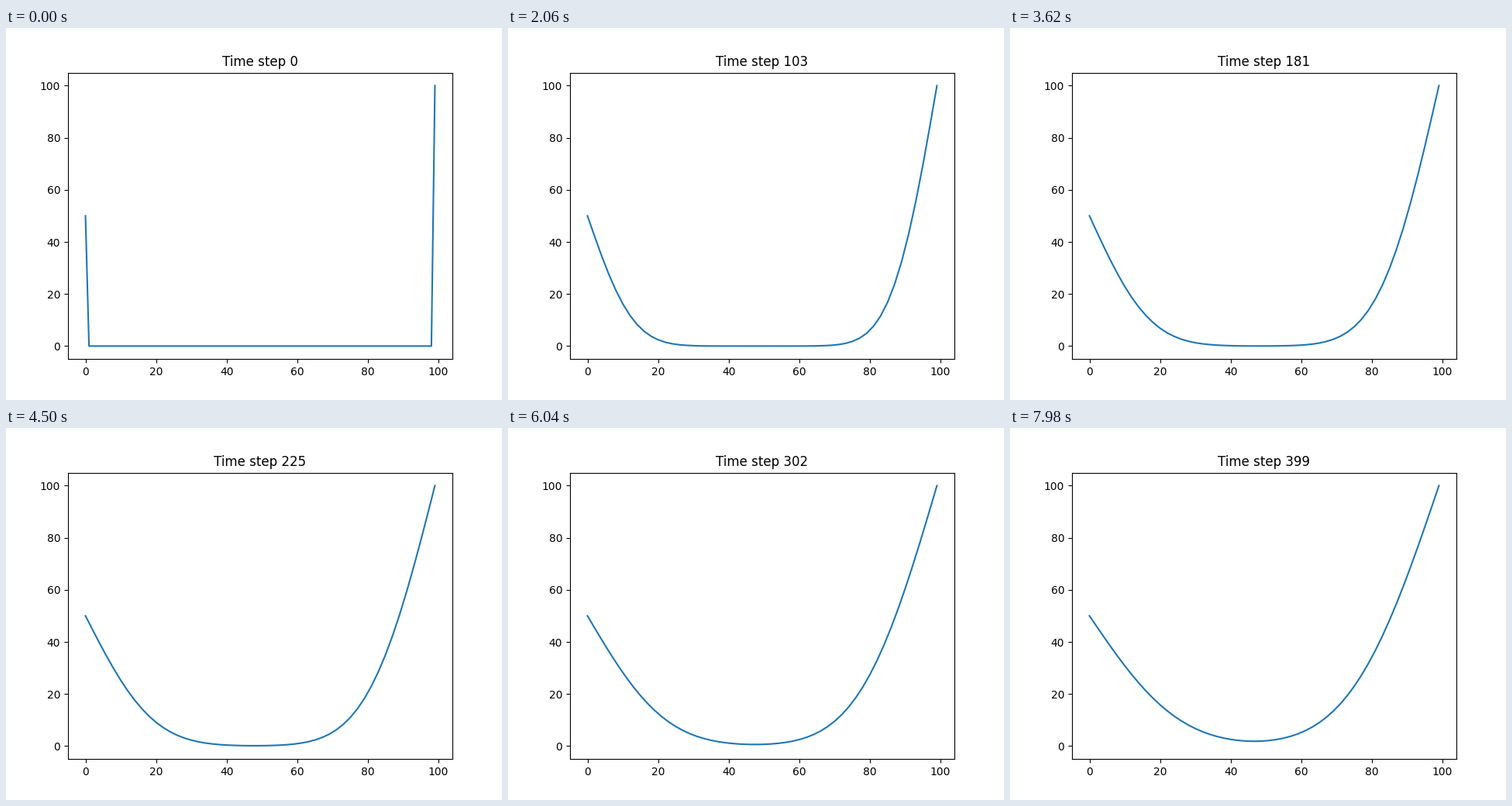
A matplotlib script that plays this animation: 640x480 px, repeating every 8 s.

```python
import numpy as np
import matplotlib.pyplot as plt
from matplotlib.animation import FuncAnimation

POINTS = 100
STEPS = 400
ALPHA = 0.5  # diffusion number: D * dt / dx**2


def solve_heat():
    """Explicit 1D heat equation with both ends held at a fixed value."""
    u = np.zeros((STEPS, POINTS))
    u[:, 0] = 50
    u[:, -1] = 100
    for n in range(STEPS - 1):
        curvature = u[n, 2:] - 2 * u[n, 1:-1] + u[n, :-2]
        u[n + 1, 1:-1] = u[n, 1:-1] + ALPHA * curvature
    return u


heat = solve_heat()

fig, ax = plt.subplots(figsize=(6.4, 4.8), dpi=100)
line, = ax.plot(heat[0])
title = ax.set_title("Time step 0")
ax.set_xlim(ax.get_xlim())
ax.set_ylim(ax.get_ylim())


def update(step):
    line.set_ydata(heat[step])
    title.set_text(f"Time step {step}")
    return line, title


anim = FuncAnimation(fig, update, frames=STEPS, interval=20,
                     repeat=True, repeat_delay=0)
plt.show()
```
